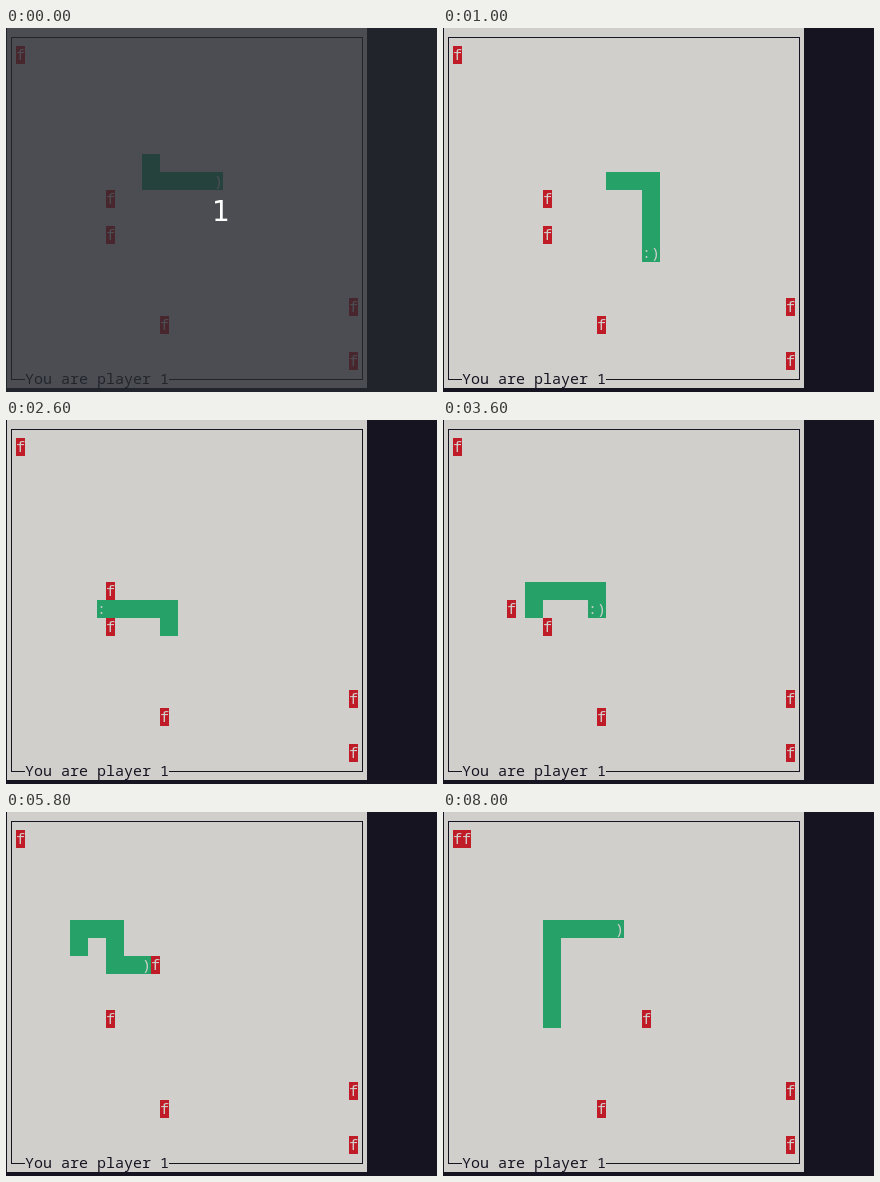
An HTML page with a canvas that plays this animation: 431x364 px, repeating every 8200 ms.

```html
<!DOCTYPE html>
<html lang="en">
<head>
<meta charset="utf-8">
<title>Terminal snake</title>
<style>
html, body { margin: 0; height: 100%; overflow: hidden; background: #171421; }
canvas { display: block; }
</style>
</head>
<body>
<canvas id="stage" width="431" height="364"></canvas>
<script>
const ctx = document.getElementById('stage').getContext('2d');
const LOOP = 8200, TICK = 100, START_TICK = 6, START_LENGTH = 9;
const CELL_W = 9, CELL_H = 18;
const DARK = '#171421', LIGHT = '#d0cfcc', GREEN = '#26a269', RED = '#c01c28';

// Route of the head: direction and number of cells
const MOVES = { U: [0, -1], D: [0, 1], L: [-1, 0], R: [1, 0] };
const ROUTE = 'D1 R7 D5 L5 U3 L8 U1 R7 D1 L9 U4 R4 D2 R5 D3 L5 U5 R7';
const path = [[15, 7]];
for (const leg of ROUTE.split(' ')) {
  const [dx, dy] = MOVES[leg[0]];
  for (let i = 0; i < +leg.slice(1); i++) {
    const [x, y] = path[path.length - 1];
    path.push([x + dx, y + dy]);
  }
}

// Each food lives during the ticks [from, until)
const foods = [
  { x: 1, y: 1 }, { x: 17, y: 16 }, { x: 38, y: 15 }, { x: 38, y: 18 },
  { x: 11, y: 9, until: 30 },
  { x: 7, y: 10, from: 30, until: 46 },
  { x: 16, y: 8, from: 46, until: 60 },
  { x: 11, y: 11, until: 69 },
  { x: 22, y: 11, from: 60 },
  { x: 2, y: 1, from: 69 },
];

function block(col, row, width, color) {
  ctx.fillStyle = color;
  ctx.fillRect(1 + col * CELL_W, row * CELL_H, width * CELL_W, CELL_H);
}

function print(text, col, row, color) {
  ctx.fillStyle = color;
  ctx.font = '15px "Noto Sans Mono", monospace';
  ctx.textAlign = 'left';
  [...text].forEach((char, i) =>
    ctx.fillText(char, 1 + (col + i) * CELL_W, row * CELL_H + 14));
}

function drawBoard() {
  ctx.fillStyle = DARK;
  ctx.fillRect(0, 0, 431, 364);
  block(0, 0, 40, LIGHT);
  ctx.fillStyle = LIGHT;
  ctx.fillRect(1, 0, 360, 360);
  ctx.strokeStyle = DARK;
  ctx.strokeRect(5.5, 9.5, 351, 342);
  block(2, 19, 16, LIGHT);
  print('You are player 1', 2, 19, DARK);
}

function drawSnake(head, length) {
  block(...path[head], 2, GREEN);
  print(':)', ...path[head], LIGHT);
  for (let i = 1; i < length; i++) block(...path[head - i], 2, GREEN);
}

function drawCountdown() {
  ctx.fillStyle = 'rgba(38, 42, 48, 0.78)';
  ctx.fillRect(0, 0, 431, 364);
  ctx.fillStyle = '#fff';
  ctx.font = '28px "DejaVu Sans", sans-serif';
  ctx.textAlign = 'center';
  ctx.fillText('1', 215, 193);
}

function draw(time) {
  const tick = Math.floor(time % LOOP / TICK);
  const step = Math.min(Math.max(0, tick - START_TICK), path.length - START_LENGTH);
  const eaten = foods.filter(food => food.until <= tick);

  drawBoard();
  for (const { x, y, from = 0, until = Infinity } of foods) {
    if (tick < from || tick >= until) continue;
    block(x, y, 1, RED);
    print('f', x, y, LIGHT);
  }
  drawSnake(START_LENGTH - 1 + step, START_LENGTH + eaten.length);
  // A food that was just eaten leaves a blank cell for one tick
  for (const { x, y, until } of eaten) if (until === tick) block(x, y, 1, LIGHT);
  if (tick === 0) drawCountdown();
}

const start = performance.now();
function frame() {
  draw(performance.now() - start);
  requestAnimationFrame(frame);
}
frame();
</script>
</body>
</html>
```
